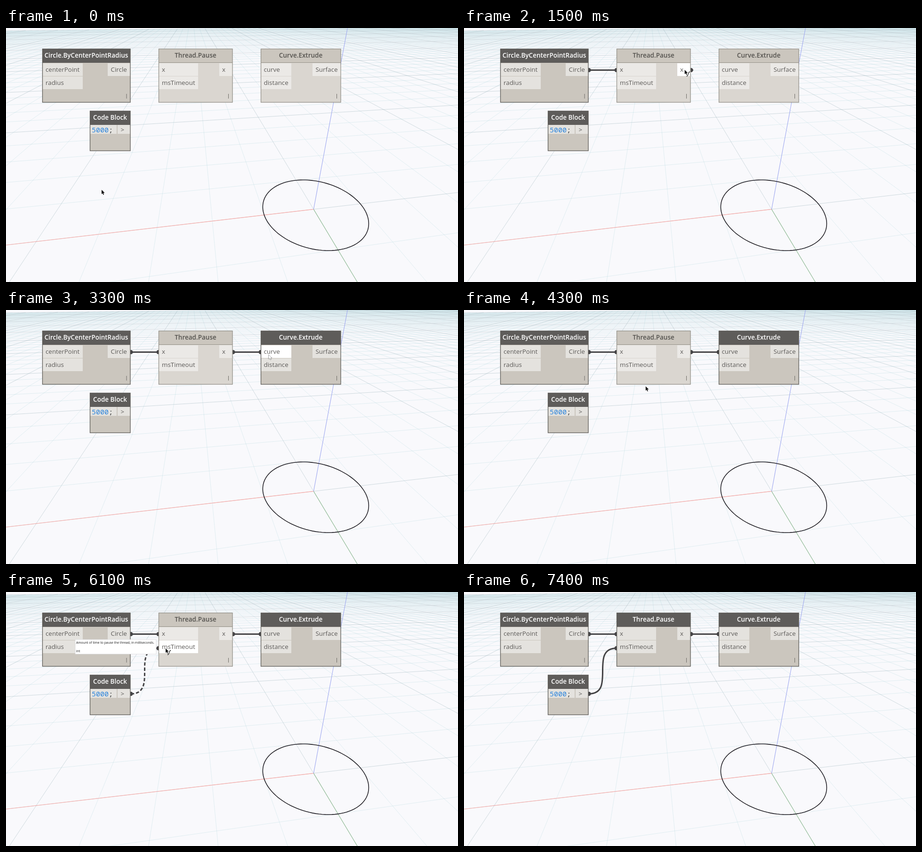
An HTML page with a canvas that plays this animation: 960 px wide and 540 px high, repeating every 8000 ms.

```html
<!DOCTYPE html>
<html lang="en">
<head>
<meta charset="utf-8">
<title>Node graph</title>
<style>
  html, body { margin: 0; width: 100%; height: 100%; overflow: hidden; background: #f9f9fc; }
  canvas { display: block; }
</style>
</head>
<body>
<canvas id="stage" width="960" height="540"></canvas>
<script>
const ctx = document.getElementById('stage').getContext('2d');
const LOOP = 8000, STEP = 100;
const SANS = '"Open Sans", "Noto Sans", sans-serif';
const MONO = '"Noto Sans Mono", "DejaVu Sans Mono", monospace';

// Ground plane: origin, two vanishing points and their projective weights.
const O = [653.3, 385.4], VU = [4347, -45], VV = [395, -45];
const KU = 0.02751, KV = 0.1666, NEAR = 0.4, HALF = 50;

function project(u, v) {
  const w = 1 + u * KU + v * KV;
  return [0, 1].map(i => (O[i] + u * KU * VU[i] + v * KV * VV[i]) / w);
}

function addLine(path, a, b) {
  path.moveTo(...a);
  path.lineTo(...b);
}

function gridPath(alongV, major) {
  const path = new Path2D();
  for (let k = -HALF; k <= HALF; k++) {
    if ((k % 5 === 0) !== major) continue;
    const [kFixed, kFree] = alongV ? [KU, KV] : [KV, KU];
    const start = Math.max(-HALF, (NEAR - 1 - k * kFixed) / kFree);
    if (start >= HALF) continue;
    const at = s => alongV ? project(k, s) : project(s, k);
    addLine(path, at(start), at(HALF));
  }
  return path;
}

function axisPath(a, b) {
  const path = new Path2D();
  addLine(path, a, b);
  return path;
}

const RADIUS = 1.004;
const circlePath = new Path2D();
for (let i = 0; i < 120; i++) {
  const a = i / 60 * Math.PI;
  circlePath.lineTo(...project(RADIUS * Math.cos(a), RADIUS * Math.sin(a)));
}
circlePath.closePath();

const MINOR = 'rgba(165,208,216,.3)', MAJOR = 'rgba(130,162,168,.36)';
const scene = [
  [gridPath(true, false), MINOR, 1],
  [gridPath(false, false), MINOR, 1],
  [gridPath(true, true), MAJOR, 1],
  [gridPath(false, true), MAJOR, 1],
  [axisPath(O, project(-20, 0)), '#f9aaa6', 1.1],
  [axisPath(O, project(0, -3)), '#93bd97', 1.1],
  [axisPath(O, [725.3, 0]), '#a0a9f0', 1.1],
  [circlePath, '#232127', 1.6]
];

// Ports: label, box, text x
const port = (label, x, y, w, tx, h = 27) => ({ label, x, y, w, h, tx });
const nodes = [
  { title: 'Circle.ByCenterPointRadius', x: 77, y: 44, w: 187, h: 114, from: 0, mark: 256,
    ports: [port('centerPoint', 78, 75, 85, 84), port('radius', 78, 103, 85, 84),
            port('Circle', 216, 75, 48, 222.5)] },
  { title: 'Thread.Pause', x: 324, y: 44, w: 157, h: 114, from: 6500, mark: 472.5,
    ports: [port('x', 325, 75, 83, 331), port('msTimeout', 325, 103, 83, 331),
            port('x', 453, 75, 28, 459)] },
  { title: 'Curve.Extrude', x: 541, y: 44, w: 170, h: 114, from: 3100, mark: 702.5,
    ports: [port('curve', 542, 75, 64, 547.5), port('distance', 542, 103, 64, 547.5),
            port('Surface', 651, 75, 60, 657.5)] },
  { title: 'Code Block', x: 178, y: 176, w: 86, h: 85, from: 0,
    ports: [port('>', 237, 206, 27, 243.5, 19)] }
];

const wires = [
  { a: [265, 89.5], b: [324, 89.5], drag: 500, join: 1000 },
  { a: [482, 89.5], b: [541, 89.5], drag: 1500, join: 3000 },
  { a: [265, 216.5], b: [324, 119.5], drag: 5000, join: 6300 }
];

const tips = [
  { from: 2100, to: 3000, x: 406, y: 82, w: 129, h: 13, lines: ['Autodesk.DesignScript.Geometry.Curve'] },
  { from: 6000, to: 6300, x: 147, y: 101, w: 172, h: 31,
    lines: ['Amount of time to pause the thread, in milliseconds.', 'int'] }
];

// Pointer keys: time, x, y
const keys = [
  [0, 203, 344], [400, 240, 89], [500, 246, 89], [800, 362, 90], [900, 362, 90],
  [1400, 462, 89], [1700, 482, 89], [1800, 482, 89], [2200, 558, 94], [2900, 558, 94],
  [3300, 558, 95], [3800, 558, 95], [4700, 248, 216], [4900, 248, 216], [5000, 250, 214],
  [5200, 290, 174], [5600, 332, 124], [5800, 332, 124], [6100, 339, 120], [6400, 339, 120],
  [7100, 355, 289], [7150, 355, 289], [7300, 72, 508], [7400, 60, 545]
];

function pointerAt(t) {
  const i = keys.findIndex(k => k[0] > t);
  if (i < 0) return keys.at(-1).slice(1);
  const [t0, x0, y0] = keys[i - 1] || keys[0], [t1, x1, y1] = keys[i];
  const p = (t - t0) / (t1 - t0);
  return [x0 + (x1 - x0) * p, y0 + (y1 - y0) * p];
}

const inside = (r, [x, y]) => x >= r.x && x < r.x + r.w && y >= r.y && y < r.y + r.h;

function box(x, y, w, h, fill) {
  ctx.fillStyle = fill;
  ctx.fillRect(x, y, w, h);
}

function text(str, x, y, font, fill, align = 'left') {
  ctx.font = font;
  ctx.fillStyle = fill;
  ctx.textAlign = align;
  ctx.fillText(str, x, y);
}

function dot([x, y], r) {
  ctx.beginPath();
  ctx.arc(x, y, r, 0, 7);
  ctx.fill();
}

function drawWire(wire, t) {
  if (t < wire.drag) return;
  const loose = t < wire.join, a = wire.a;
  let b = wire.b;
  if (loose) {
    const p = pointerAt(t);
    const snapped = p[0] >= b[0] && Math.abs(p[1] - b[1]) < 14;
    if (!snapped) b = pointerAt(t - 50);
  }
  const bend = Math.abs(b[0] - a[0]);
  ctx.strokeStyle = ctx.fillStyle = '#444345';
  ctx.lineWidth = 3;
  ctx.setLineDash(loose ? [7, 4] : []);
  ctx.beginPath();
  ctx.moveTo(...a);
  ctx.bezierCurveTo(a[0] + bend, a[1], b[0] - bend, b[1], ...b);
  ctx.stroke();
  ctx.setLineDash([]);
  dot(a, 4.6);
  dot(b, 4.6);
}

function drawNode(n, t, pointer) {
  const active = t >= n.from, edge = active ? '#5e5c58' : '#96928a';
  const head = 30;
  const pane = active ? '#e4e2de' : '#ebe9e6';
  box(n.x, n.y, n.w, n.h, active ? '#cbc6be' : '#dad6d0');
  box(n.x, n.y, n.w, head, active ? '#5e5c5a' : '#cbc6be');
  if (!active) box(n.x, n.y + head - 1, n.w, 1, edge);
  if (!n.mark) {
    box(179, 206, 56, 19, pane);
    text('5000', 182, 221.5, '500 15px ' + MONO, '#2f86dc');
    text(';', 218, 221.5, '500 15px ' + MONO, '#3c3c3c');
  }
  for (const p of n.ports) {
    box(p.x, p.y, p.w, p.h, inside(p, pointer) ? '#fff' : pane);
    text(p.label, p.tx, p.y + (n.mark ? 18 : 14.5), '13.4px ' + SANS, '#5c5a58');
  }
  text(n.title, n.x + n.w / 2, n.y + 18.5, '600 13.5px ' + SANS, active ? '#fff' : '#55534f', 'center');
  if (n.mark) text('l', n.mark, 150, '12px ' + SANS, '#6a6864', 'center');
  ctx.strokeStyle = edge;
  ctx.lineWidth = 1.3;
  ctx.strokeRect(n.x + 0.5, n.y + 0.5, n.w - 0.5, n.h - 0.5);
}

function drawTip(tip) {
  box(tip.x, tip.y, tip.w, tip.h, '#fff');
  ctx.strokeStyle = '#d3d3d6';
  ctx.lineWidth = 0.7;
  ctx.strokeRect(tip.x, tip.y, tip.w, tip.h);
  tip.lines.forEach((s, i) => text(s, tip.x + 2, tip.y + 9 + i * 17.5, '6.8px ' + SANS, '#1c1c1c'));
}

const arrow = new Path2D('M0 0V9.2L2.1 7.3L3.6 10.8L5.2 10.1L3.7 6.8L6.6 6.6Z');
const squiggle = new Path2D('M4 13.5C9 13 6 5 11 4');

function drawPointer([x, y], t) {
  const wiring = wires.some(w => t >= w.drag && t < w.join);
  const hovering = nodes.some(n => n.ports.some(p => inside(p, [x, y])));
  const hollow = hovering && !wiring;
  ctx.save();
  ctx.translate(x, y);
  ctx.lineWidth = hollow ? 0.9 : 0.7;
  ctx.strokeStyle = hollow ? '#333' : '#fff';
  ctx.fillStyle = hollow ? '#fff' : '#111';
  ctx.stroke(arrow);
  ctx.fill(arrow);
  if (wiring) {
    ctx.strokeStyle = '#222';
    ctx.lineWidth = 1.3;
    ctx.stroke(squiggle);
  }
  ctx.restore();
}

function draw(t) {
  const pointer = pointerAt(t);
  box(0, 0, 960, 540, '#f9f9fc');
  for (const [path, color, width] of scene) {
    ctx.strokeStyle = color;
    ctx.lineWidth = width;
    ctx.stroke(path);
  }
  wires.forEach(w => drawWire(w, t));
  nodes.forEach(n => drawNode(n, t, pointer));
  tips.forEach(tip => { if (t >= tip.from && t < tip.to) drawTip(tip); });
  if (t < 7400) drawPointer(pointer, t);
}

const begin = performance.now();
function frame() {
  const t = (performance.now() - begin) % LOOP;
  draw(Math.floor(t / STEP) * STEP);
  requestAnimationFrame(frame);
}
frame();
</script>
</body>
</html>
```
